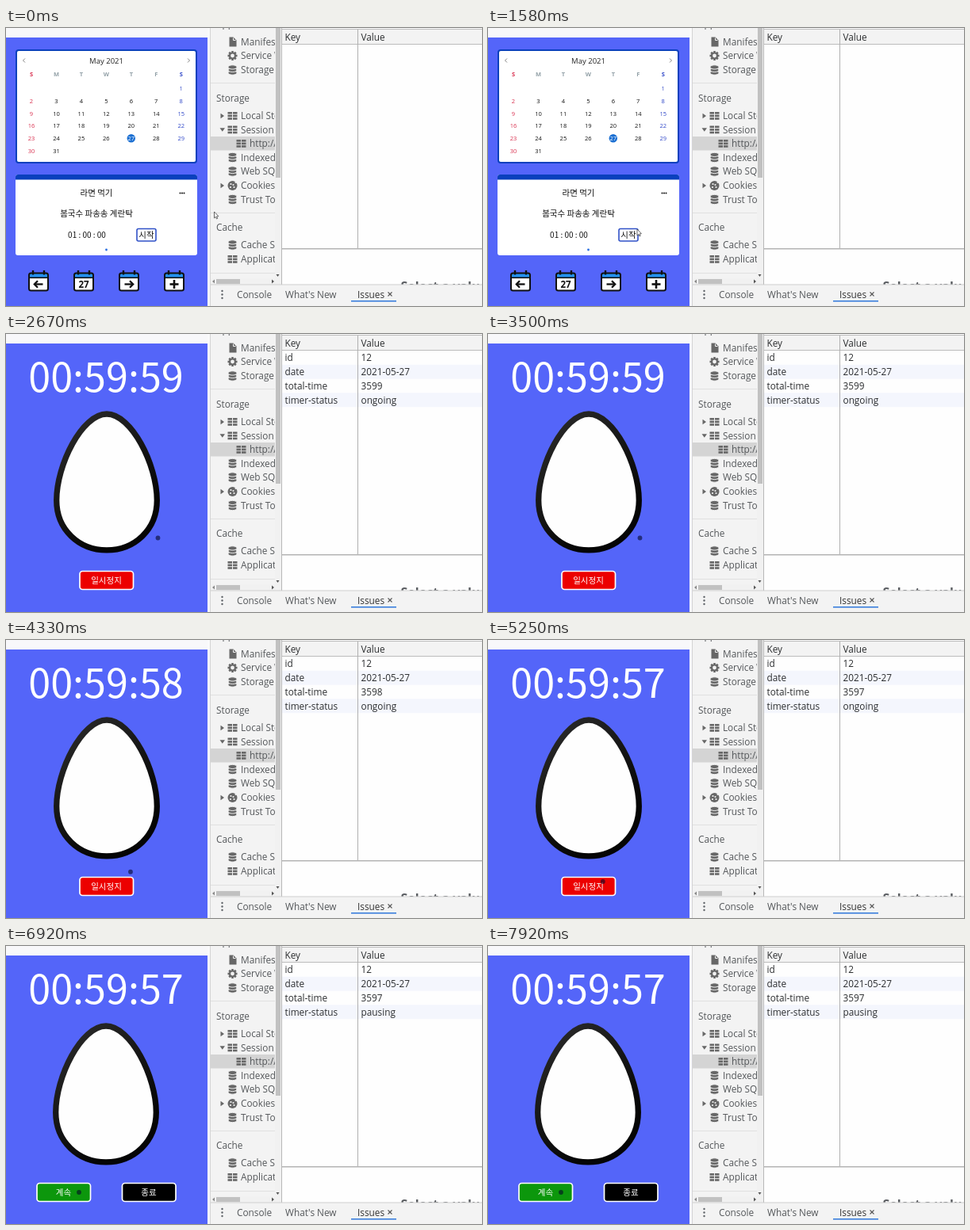
Recreate the animation shown at these times as an HTML page with a canvas. Size 600x351 px, loop 8000 ms.

```html
<!DOCTYPE html>
<html lang="ko">
<head>
<meta charset="utf-8">
<title>Timer demo</title>
<style>
html, body { margin: 0; width: 100%; height: 100%; overflow: hidden; background: #fff; }
canvas { display: block; width: 600px; height: 351px; }
</style>
</head>
<body>
<canvas id="stage" width="600" height="351"></canvas>
<script>
const ctx = document.getElementById('stage').getContext('2d');
const LOOP = 8000;
const START = 1660, PAUSE = 5330, FADE = 800;
const TICKS = [2580, 3580, 4580];
const UI = '"Open Sans", "Noto Sans", sans-serif';
const KR = '"Noto Sans CJK KR", "Noto Sans CJK JP", "Noto Sans CJK", sans-serif';
const BLUE = '#5465f9', DEEP = '#0a40bd', INK = '#2c2e30', SOFT = '#54575a', ICON = '#676767';
const PANEL = '#f3f3f3';

function box(x, y, w, h, color) {
  ctx.fillStyle = color;
  ctx.fillRect(x, y, w, h);
}

function round(x, y, w, h, r, fill, stroke, line) {
  ctx.beginPath();
  ctx.roundRect(x, y, w, h, r);
  if (fill) { ctx.fillStyle = fill; ctx.fill(); }
  if (stroke) { ctx.strokeStyle = stroke; ctx.lineWidth = line; ctx.stroke(); }
}

function disc(x, y, r, color) {
  ctx.beginPath();
  ctx.arc(x, y, r, 0, Math.PI * 2);
  ctx.fillStyle = color;
  ctx.fill();
}

function path(points, color, line) {
  ctx.beginPath();
  points.forEach(([x, y], i) => i ? ctx.lineTo(x, y) : ctx.moveTo(x, y));
  if (line) {
    ctx.strokeStyle = color;
    ctx.lineWidth = line;
    ctx.stroke();
  } else {
    ctx.closePath();
    ctx.fillStyle = color;
    ctx.fill();
  }
}

function text(str, x, y, size, color, { font = UI, align = 'left', weight = 400 } = {}) {
  ctx.font = `${weight} ${size}px ${font}`;
  ctx.textAlign = align;
  ctx.textBaseline = 'alphabetic';
  ctx.fillStyle = color;
  ctx.fillText(str, x, y);
}

const label = (str, x, y, color = INK) => text(str, x, y + 4.2, 11.8, color);
const korean = (str, x, y, color = '#111', size = 10.5) =>
  text(str, x, y + size * 0.37, size, color, { font: KR, align: 'center' });

// Sidebar icons, centred on x, y
const icons = {
  doc(x, y) {
    path([[x - 4, y - 6], [x + 1, y - 6], [x + 5, y - 2], [x + 5, y + 6], [x - 4, y + 6]], ICON);
    path([[x + 1, y - 5], [x + 1, y - 2], [x + 4, y - 2]], PANEL, 1);
  },
  gear(x, y) {
    for (let i = 0; i < 4; i++) {
      const a = i * Math.PI / 4, dx = Math.cos(a) * 6, dy = Math.sin(a) * 6;
      path([[x - dx, y - dy], [x + dx, y + dy]], ICON, 2.6);
    }
    disc(x, y, 4.6, ICON);
    disc(x, y, 2.4, PANEL);
  },
  db(x, y) {
    for (const dy of [3.6, 0, -3.6]) {
      ctx.beginPath();
      ctx.ellipse(x, y + dy, 5.5, 2.6, 0, 0, Math.PI * 2);
      ctx.fillStyle = ICON;
      ctx.fill();
      ctx.strokeStyle = PANEL;
      ctx.lineWidth = 1;
      ctx.stroke();
    }
  },
  grid(x, y) {
    for (const dx of [-6, 0.5])
      for (const dy of [-5, -1.4, 2.2]) box(x + dx, y + dy, 5.5, 2.6, ICON);
  },
  cookie(x, y) {
    disc(x, y, 6, ICON);
    for (const [dx, dy] of [[-2, -2], [2, 2], [-2.5, 2], [4, -4], [1, -1]])
      disc(x + dx, y + dy, 1.1, PANEL);
  }
};

const TREE = [
  ['doc', 'Manifest', 17.5], ['gear', 'Service Workers', 35], ['db', 'Storage', 53],
  ['grid', 'Local Storage', 111, 'closed'], ['grid', 'Session Storage', 128.5, 'open'],
  ['grid', 'http://localhost', 146, '', 11], ['db', 'IndexedDB', 163.5], ['db', 'Web SQL', 181],
  ['cookie', 'Cookies', 199, 'closed'], ['db', 'Trust Tokens', 216.5],
  ['db', 'Cache Storage', 274], ['grid', 'Application Cache', 292]
];

function drawSidebar() {
  box(254, 0, 4, 351, '#fafafb');
  box(257, 0, 1, 351, '#d4d4d4');
  box(258, 0, 89, 324, PANEL);
  ctx.save();
  ctx.beginPath();
  ctx.rect(258, 0, 81, 316);
  ctx.clip();
  box(258, 137, 81, 17.5, '#d4d4d4');
  for (const y of [69, 233, 309]) box(258, y, 81, 1, '#e0e0e0');
  label('Application', 265, -5, SOFT);
  label('Storage', 265, 88.5, SOFT);
  label('Cache', 265, 252, SOFT);
  for (const [icon, name, y, arrow, indent = 0] of TREE) {
    icons[icon](285.5 + indent, y);
    label(name, 296 + indent, y, SOFT);
    if (arrow === 'closed') path([[270.5, y - 3.3], [275, y], [270.5, y + 3.3]], ICON);
    if (arrow === 'open') path([[269.5, y - 2.2], [276, y - 2.2], [272.8, y + 2.3]], ICON);
  }
  ctx.restore();
  box(339, 0, 8, 324, '#f1f1f1');
  box(340, 0, 6, 189, '#c1c1c1');
  path([[340.5, 311], [344.5, 311], [342.5, 314]], '#555');
  box(258, 316, 81, 8, '#f1f1f1');
  box(265, 317, 30, 6, '#c1c1c1');
  path([[263, 317.5], [263, 322.5], [260, 320]], '#888');
  path([[335, 317.5], [335, 322.5], [338, 320]], '#555');
}

function drawTable(rows) {
  box(347, 0, 253, 324, '#fefefe');
  box(348, 2, 252, 18, PANEL);
  rows.forEach(([key, value], i) => {
    const y = 21 + i * 17.8;
    if (i % 2) box(348, y, 252, 17.8, '#f4f6fd');
    label(key, 351.5, y + 9.2);
    label(value, 447.5, y + 9.2);
  });
  box(348, 1, 252, 1, '#bcbcbc');
  box(348, 20, 252, 1, '#bcbcbc');
  box(443, 2, 1, 276, '#b0b0b0');
  box(348, 278, 252, 1.5, '#b4b4b4');
  box(346.5, 0, 1.5, 324, '#b8b8b8');
  label('Key', 351.5, 11.5);
  label('Value', 447.5, 11.5);
  text('Select a value to preview', 497.5, 332, 16, '#5a5d61', { weight: 700 });
}

function drawDrawer() {
  box(258, 324, 342, 27, PANEL);
  box(258, 323.5, 342, 1, '#d0d0d0');
  for (const y of [332, 336.5, 341]) disc(272.5, y, 1.2, '#5f6368');
  label('Console', 291, 336.5, SOFT);
  label("What's New", 352, 336.5, SOFT);
  label('Issues', 443, 336.5, '#333');
  path([[481.5, 333.5], [486.5, 338.5]], '#555', 1.1);
  path([[486.5, 333.5], [481.5, 338.5]], '#555', 1.1);
  box(435, 344, 57, 1.6, '#3a7fdc');
}

function drawCalendar() {
  round(13, 28, 227, 142, 3, '#fff', DEEP, 2);
  const mid = { align: 'center' };
  text('May 2021', 126.5, 44.5, 9.5, '#222', mid);
  path([[24, 38.5], [21.5, 41], [24, 43.5]], '#777', 0.9);
  path([[229, 38.5], [231.5, 41], [229, 43.5]], '#777', 0.9);
  const colX = c => 32 + c * 31.45;
  const tint = (c, other) => c === 0 ? '#d9304f' : c === 6 ? '#3048c8' : other;
  [...'SMTWTFS'].forEach((d, c) =>
    text(d, colX(c), 61, 7.5, tint(c, '#93a1a8'), { align: 'center', weight: 700 }));
  for (let day = 1; day <= 31; day++) {
    const c = (day + 5) % 7, y = 76.3 + Math.floor((day + 5) / 7) * 15.75;
    if (day === 27) disc(colX(c), y, 5.2, '#1b6fd2');
    text(day, colX(c), y + 2.8, 7.5, day === 27 ? '#fff' : tint(c, '#111'), mid);
  }
}

function drawTask() {
  round(12, 185, 229, 102, 3, '#fff');
  round(12, 185, 229, 6.5, [3, 3, 0, 0], DEEP);
  korean('라면 먹기', 114, 208.5);
  for (const x of [219.5, 222, 224.5]) disc(x, 208.5, 1, '#111');
  korean('봄국수 파송송 계란탁', 114, 234);
  korean('01 : 00 : 00', 102, 261, '#111', 10);
  round(165, 253.5, 24, 15.5, 2, '#fff', '#3152c8', 1.6);
  korean('시작', 177, 261);
  disc(126.5, 280, 1.4, '#2a6fe0');
}

function drawIcon(x, symbol) {
  round(x - 12, 309.5, 24, 22, 2.5, '#fff');
  box(x - 12, 309.5, 24, 5.5, '#2492f0');
  box(x - 12, 314.5, 24, 1.6, '#111');
  round(x - 12, 309.5, 24, 22, 2.5, null, '#111', 2);
  for (const dx of [-7, 7]) path([[x + dx, 306], [x + dx, 311.5]], '#111', 2.4);
  const y = 323.5;
  if (symbol === '27') {
    text('27', x, y + 4.2, 11.5, '#111', { align: 'center', weight: 700 });
  } else if (symbol === '+') {
    path([[x - 5.5, y], [x + 5.5, y]], '#111', 2.6);
    path([[x, y - 5.5], [x, y + 5.5]], '#111', 2.6);
  } else {
    const s = symbol === '<' ? -1 : 1;
    path([[x - 5.5 * s, y], [x + 4.5 * s, y]], '#111', 2.3);
    path([[x + s, y - 4.3], [x + 5.2 * s, y], [x + s, y + 4.3]], '#111', 2.3);
  }
}

function drawEgg(x) {
  const shade = ctx.createLinearGradient(x - 60, 110, x + 40, 230);
  shade.addColorStop(0, '#2b2b2b');
  shade.addColorStop(1, '#050505');
  ctx.beginPath();
  ctx.moveTo(x, 101);
  ctx.bezierCurveTo(x + 31, 101, x + 63.3, 165, x + 63.3, 210);
  ctx.bezierCurveTo(x + 63.3, 247, x + 35, 272.8, x, 272.8);
  ctx.bezierCurveTo(x - 35, 272.8, x - 63.3, 247, x - 63.3, 210);
  ctx.bezierCurveTo(x - 63.3, 165, x - 31, 101, x, 101);
  ctx.closePath();
  ctx.fillStyle = '#fefefe';
  ctx.fill();
  ctx.strokeStyle = shade;
  ctx.lineWidth = 7.3;
  ctx.stroke();
}

function drawButton(x, name, color) {
  round(x + 1, 299.5, 67.5, 23, 3.5, color, '#fff', 1.7);
  korean(name, x + 34.5, 311, '#fff');
}

function drawTimer(t, left) {
  const two = n => String(n).padStart(2, '0');
  const clock = [left / 3600, left / 60 % 60, left % 60].map(n => two(Math.floor(n))).join(':');
  text(clock, 126, 73.3, 50.3, '#fff', { font: KR, align: 'center' });
  const paused = t >= PAUSE;
  drawEgg(paused ? 126 : 127);
  if (paused) {
    ctx.globalAlpha = Math.min(1, (t - PAUSE) / FADE);
    drawButton(38, '계속', '#0c970c');
    drawButton(145.5, '종료', '#000');
    ctx.globalAlpha = 1;
  } else {
    drawButton(92, '일시정지', '#ec0000');
  }
}

// time, x, y
const MOVES = [
  [0, 262.5, 232], [830, 262.5, 232], [1170, 188, 254], [START, 188, 254],
  [START, 191.5, 257.5], [3830, 191.5, 257.5], [4580, 145, 305],
  [6080, 144.5, 305], [6600, 92, 311], [LOOP, 92, 311]
];

function pointer(t) {
  const i = MOVES.findIndex(m => m[0] > t);
  const [t0, x0, y0] = MOVES[i - 1], [t1, x1, y1] = MOVES[i];
  const p = (t - t0) / (t1 - t0), e = p * p * (3 - 2 * p);
  return [x0 + (x1 - x0) * e, y0 + (y1 - y0) * e];
}

function drawArrow(x, y) {
  const shape = [[0, 0], [0, 8], [1.8, 6.4], [3, 9], [4.2, 8.4], [3.1, 5.9], [5.4, 5.7]]
    .map(([dx, dy]) => [x + dx, y + dy]);
  path(shape, '#fff');
  path([...shape, shape[0]], '#444', 0.8);
}

function draw(t) {
  const running = t >= START;
  const left = 3600 - TICKS.filter(k => t >= k).length;
  box(0, 0, 600, 351, '#fff');
  box(0, 0, 254, 12, '#f8f8fa');
  box(0, 12, 254, 339, BLUE);
  drawTable(running ? [
    ['id', '12'], ['date', '2021-05-27'], ['total-time', left],
    ['timer-status', t >= PAUSE ? 'pausing' : 'ongoing']
  ] : []);
  drawSidebar();
  drawDrawer();
  const [x, y] = pointer(t);
  if (running) {
    drawTimer(t, left);
    disc(x, y, 2.9, 'rgba(5, 8, 40, 0.6)');
  } else {
    drawCalendar();
    drawTask();
    ['<', '27', '>', '+'].forEach((s, i) => drawIcon(41 + i * 57, s));
    drawArrow(x, y);
  }
}

const origin = performance.now();
function frame() {
  draw((performance.now() - origin) % LOOP);
  requestAnimationFrame(frame);
}
frame();
</script>
</body>
</html>
```
